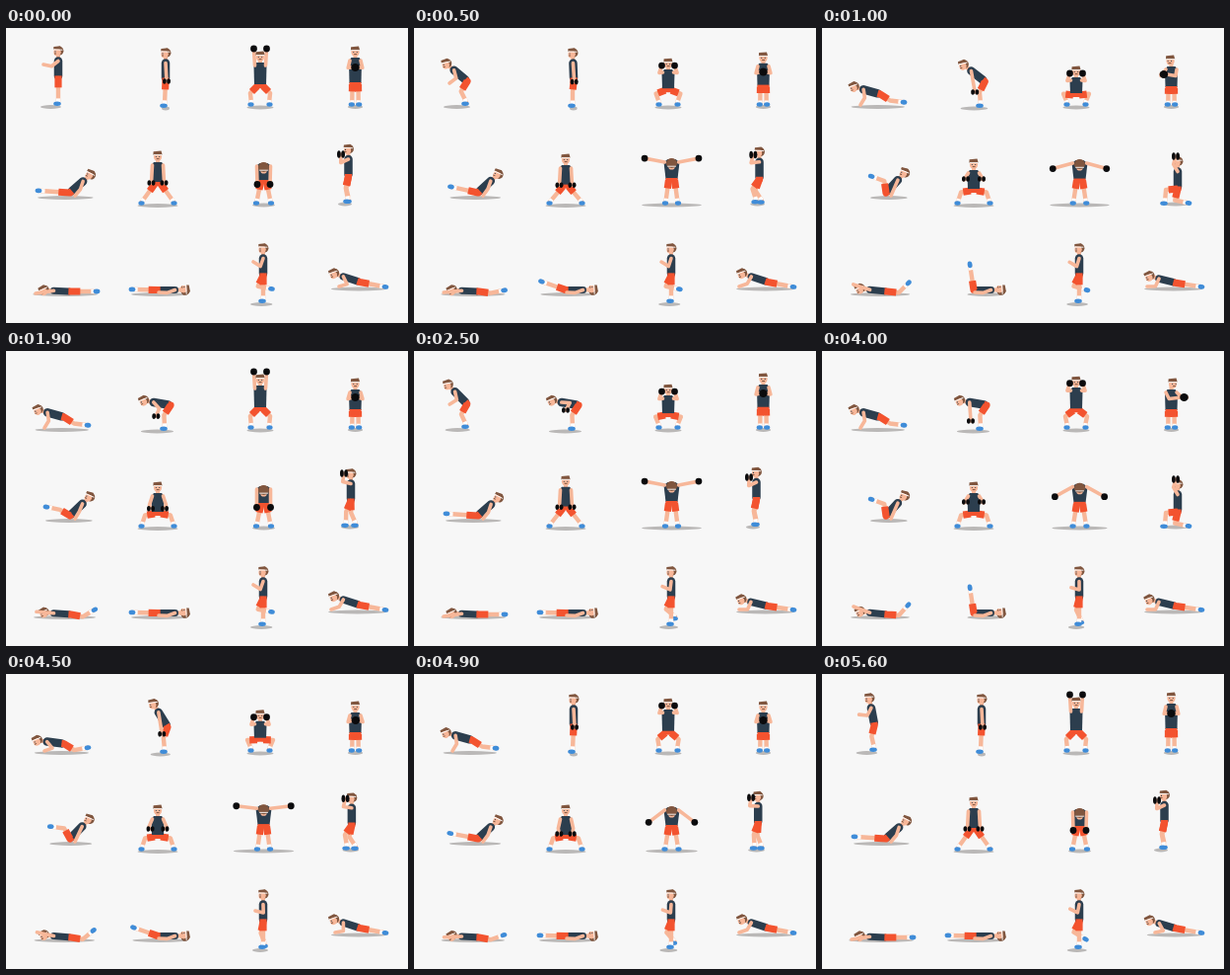
An HTML page with a canvas that plays this animation: 408x299 px, repeating every 5700 ms.

```html
<!DOCTYPE html>
<html lang="en">
<head>
<meta charset="utf-8">
<title>Workout</title>
<style>
html, body { margin: 0; width: 100%; height: 100%; overflow: hidden; background: #f7f7f7; }
canvas { display: block; width: 408px; height: 299px; }
</style>
</head>
<body>
<canvas id="stage"></canvas>
<script>
const W = 408, H = 299, LOOP = 5700, STEP = 100;
const SKIN = '#f7b799', HAIR = '#80563f', SHIRT = '#2c3e4e', SHORTS = '#f3532f',
      SHOE = '#3f8cd8', SHADOW = '#bab8b7', IRON = '#0b0b0d', WHITE = '#fff';
const TORSO = 17.5, NECK = 10, LEG = 24, FRONT_LEG = 20, ARM = 17;

const canvas = document.getElementById('stage');
const ctx = canvas.getContext('2d');
const ratio = window.devicePixelRatio || 1;
canvas.width = W * ratio;
canvas.height = H * ratio;

// Timing and geometry
const ease = x => { x = Math.min(1, Math.max(0, x)); return x * x * (3 - 2 * x); };
const ramp = (t, from, to) => ease((t - from) / (to - from));
const hold = (t, a, b, c, d) => ramp(t, a, b) - ramp(t, c, d);   // rises a-b, falls c-d
const mix = (a, b, u) => Array.isArray(a) ? a.map((v, i) => mix(v, b[i], u)) : a + (b - a) * u;
const blend = (a, b, u) => Object.fromEntries(
  Object.entries(a).map(([key, v]) => [key, key in b ? mix(v, b[key], u) : v]));
const polar = ([x, y], angle, r) => [x + r * Math.sin(angle), y - r * Math.cos(angle)];

// How far the middle joint of a limb leaves the straight line between its ends.
const slack = (a, b, length) =>
  Math.sqrt(Math.max(0, length ** 2 - (b[0] - a[0]) ** 2 - (b[1] - a[1]) ** 2)) / 2;

function joint(a, b, length, bend) {
  const dx = b[0] - a[0], dy = b[1] - a[1];
  const k = bend * slack(a, b, length) / (Math.hypot(dx, dy) || 1);
  return [(a[0] + b[0]) / 2 - dy * k, (a[1] + b[1]) / 2 + dx * k];
}

// Drawing helpers
function line(color, width, ...pts) {
  ctx.strokeStyle = color;
  ctx.lineWidth = width;
  ctx.beginPath();
  pts.forEach(p => ctx.lineTo(...p));
  ctx.stroke();
}

function oval(color, x, y, rx, ry = rx, angle = 0) {
  ctx.fillStyle = color;
  ctx.beginPath();
  ctx.ellipse(x, y, rx, ry, angle, 0, 7);
  ctx.fill();
}

function shape(color, ...pts) {
  ctx.fillStyle = color;
  ctx.beginPath();
  pts.forEach(p => ctx.lineTo(...p));
  ctx.fill();
}

const dumbbell = ([x, y], ry = 3) => [-2.1, 2.1].forEach(d => oval(IRON, x + d, y, 1.9, ry));

function limb(waist, hip, knee, ankle) {
  line(SKIN, 4.4, hip, knee, ankle);
  ctx.lineCap = 'butt';
  line(WHITE, 4.2, mix(ankle, knee, .3), ankle);
  line(SHORTS, 7.2, waist, hip, mix(hip, knee, .78));
  ctx.lineCap = 'round';
}

function sideLeg(waist, hip, ankle) {
  const knee = joint(hip, ankle, LEG, 1);
  limb(waist, hip, knee, ankle);
  const shin = Math.atan2(ankle[1] - knee[1], ankle[0] - knee[0]);
  const standing = Math.sin(shin) > .6;
  if (standing) oval(SHOE, ankle[0] - 1, ankle[1] + 1.8, 3.8, 2.2);
  else oval(SHOE, ankle[0] + Math.cos(shin) * 2, ankle[1] + Math.sin(shin) * 2, 3.4, 2.4, shin);
}

function sideHead(x, y, tilt) {
  ctx.save();
  ctx.translate(x, y);
  ctx.rotate(tilt);
  oval(HAIR, 1.2, -.3, 4.2, 4.4);
  oval(SKIN, -1, 1, 3.6, 4);
  shape(HAIR, [-4.8, -2], [-4.6, -4.6], [2, -5.2], [4.6, -2]);
  line(WHITE, .9, [-4.2, -1.6], [4, -1.3]);
  oval(SKIN, 1.4, .9, 1.2);
  oval(SHIRT, -3, .4, .6);
  line(HAIR, 1, [-3.8, 2.5], [-2.4, 2.5]);
  ctx.restore();
}

function frontHead(x, y, turn) {
  oval(SKIN, x, y + .5, 4.1, 4.7);
  shape(HAIR, [x - 4.6, y - 1.6], [x - 4.4, y - 4.8], [x + 3.5, y - 5.4], [x + 4.6, y - 1.6]);
  line(WHITE, .9, [x - 3.9, y - 1.4], [x + 3.9, y - 1.4]);
  [-1.7, 1.7].forEach(d => oval(SHIRT, x + d + turn, y + .5, .6));
  line(HAIR, 1, [x - 1.2 + turn, y + 2.6], [x + 1.2 + turn, y + 2.6]);
}

function topHead(x, y) {
  oval(SKIN, x, y + 4.5, 3, 2);
  oval(HAIR, x, y, 5.6, 5);
  line(WHITE, .9, [x - 4, y + 3.2], [x + 4, y + 3.2]);
}

// Figure seen from the side, facing left: lean turns the torso about the hip,
// knees and elbows follow from where hands and feet are.
function side({ hip, lean, hand, foot, foot2 }, floor, { girth = 8.5, iron } = {}) {
  const shoulder = polar(hip, lean, TORSO);
  const head = polar(shoulder, lean, NECK);
  const waist = mix(hip, shoulder, .15);
  const xs = [hip, head, hand, foot, foot2 || foot].map(p => p[0]);
  const left = Math.min(...xs), right = Math.max(...xs);
  oval(SHADOW, (left + right) / 2, floor, (right - left) / 2 + 3, 1.9);

  if (foot2) sideLeg(waist, hip, foot2);
  line(SKIN, 4, head, shoulder);
  line(SHIRT, girth, shoulder, waist);
  sideLeg(waist, hip, foot);
  sideHead(...head, lean > 0 ? .6 * lean * lean : .3 * lean);
  line(SKIN, 3.6, shoulder, joint(shoulder, hand, ARM, -1), hand);
  if (iron) dumbbell(hand, iron);
}

// Figure seen from the front and mirrored about x; hand and foot are [offset, y].
function front({ head, hip, hand, foot, twist = 0 }, x, floor, { bent, bow = 1, iron } = {}) {
  const top = head + (bent ? -4 : 6), wide = bent ? 8 : 6.5;
  const shoulder = [wide - 1, top + 3];
  const both = draw => [-1, 1].forEach(s => draw(([dx, y], shift = 0) => [x + s * dx + shift, y]));
  const bend = slack(shoulder, hand, ARM);
  const middle = mix(shoulder, hand, .5);
  const elbow = [middle[0] + bend * .4, middle[1] + bend * .5];
  const thigh = [3, hip + 2];
  const knee = joint(thigh, foot, FRONT_LEG, -bow);
  oval(SHADOW, x, floor, Math.max(foot[0] + 4.5, hand[0] + 3), 1.9);

  both(at => {
    limb(at(thigh), at(thigh), at(knee), at(foot));
    oval(SHOE, ...at([foot[0] + .5, foot[1] + 1.5]), 3.1, 2.2);
  });
  line(SKIN, 4, [x, head], [x, top + 1]);
  shape(SHIRT, [x - 4, top], [x + 4, top], [x + wide, top + 3], [x + 6, hip + 1],
        [x - 6, hip + 1], [x - wide, top + 3]);
  shape(SHORTS, [x - 6, hip], [x + 6, hip], [x + 6, hip + 4], [x - 6, hip + 4]);
  both(at => line(SKIN, 3.6, at(shoulder), at(elbow, twist * .4), at(hand, twist)));
  if (bent) topHead(x, head);
  else frontHead(x + twist * .12, head, twist * .1);
  if (iron === 'single') oval(IRON, x + twist, hand[1], 4.3, 4);
  else both(at => iron === 'small' ? dumbbell(at(hand), 2.8) : oval(IRON, ...at(hand), 3.4));
}

// Exercises
function burpee(time) {
  const t = time % 2850;
  const stand = { hip: [53, 51], lean: 0, hand: [38, 37], foot: [53, 75] };
  const crouch = { hip: [54, 54], lean: -.87, hand: [36, 56] };
  const plank = { hip: [59, 67], lean: -1.3, hand: [39, 78], foot: [81, 75] };
  const down = { hip: [59, 72], lean: -1.5 };
  let pose = blend(stand, crouch, hold(t, 0, 450, 2400, 2900));
  pose = blend(pose, plank, hold(t, 550, 850, 2150, 2380));
  side(blend(pose, down, hold(t, 1250, 1550, 1550, 1850)), 80);
}

function deadlift(time) {
  const t = time % 5600;
  const stand = { hip: [162, 53], lean: 0, hand: [163, 54], foot: [161, 77] };
  const bent = { hip: [167, 55], lean: -1.4, hand: [151, 71] };
  const pose = blend(stand, bent, hold(t, 400, 1400, 4100, 4800));
  const row = hold(t, 1600, 2250, 2600, 3300);
  side(blend(pose, { hand: [154, 60] }, row), 81.5, { iron: 2.8 });
}

function thruster(time) {
  const t = time % (5600 / 3);
  const squat = hold(t, 40, 1000, 1000, 1200);
  const rack = hold(t, 40, 300, 1250, 1500);
  const head = 29 + 15 * squat;
  front({ head, hip: 57 + 9 * squat, hand: [6.5, head - 8 + 10 * rack], foot: [9, 76] }, 258, 80.5);
}

function kettlebell(time) {
  const t = time % 2800;
  const sink = hold(t, 200, 700, 2200, 2750);
  const turn = hold(t, 750, 1200, 1250, 1750) * (time % 5600 < 2800 ? -1 : 1);
  front({ head: 24 + 9 * sink, hip: 55 + 4 * sink, hand: [3, 40 + 7 * sink], foot: [3.2, 76],
          twist: 13 * turn }, 354.5, 80, { bow: 0, iron: 'single' });
}

function tuck(time) {
  const u = hold(time % 2800, 300, 900, 1300, 2450);
  side({ hip: [65, 167], lean: .85 - .1 * u, hand: [70, 170], foot: mix([35, 165], [52, 151], u) }, 172);
}

function sumoCurl(time) {
  const t = time % 2800;
  const squat = hold(t, 250, 850, 2150, 2650);
  const curl = hold(t, 700, 1000, 1250, 2300);
  front({ head: 130 + 8 * squat, hip: 156 + 7 * squat, foot: [16, 176],
          hand: [6.5 + 1.5 * curl, 157 + 6 * squat - 10 * curl] }, 154, 180, { iron: 'small' });
}

function reverseFly(time) {
  const lift = hold(time % (5600 / 3), 0, 480, 633, 1700);
  const hand = polar([6.5, 137], Math.PI - 1.8 * lift, 21.5);
  front({ head: 141 - 4 * lift, hip: 154 - 2 * lift, hand, foot: [7 - lift, 176] },
        261.5, 179.5, { bent: true });
}

function lunge(time) {
  const t = time % 2800;
  const ready = { hip: [347.5, 150.5], lean: 0, hand: [340, 128], foot: [347, 174], foot2: [348, 174] };
  const kneel = { hip: [361, 163], hand: [359, 130], foot: [348, 176], foot2: [370, 177] };
  const pace = { hip: [350, 152], hand: [343, 124], foot: [345, 175], foot2: [355, 175] };
  const pose = blend(ready, pace, hold(t, 1500, 1850, 1900, 2450));
  side(blend(pose, kneel, hold(t, 300, 950, 1250, 1850)), 178.5, { iron: 3.8 });
}

function superman(time) {
  const u = hold(time % 2800, 350, 1150, 1300, 2450);
  side({ hip: [66, 267], lean: -1.53 + .06 * u, hand: mix([30, 269], [32, 259], u),
         foot: mix([90, 267], [86, 259], u) }, 270, { girth: 7 });
}

function legRaise(time) {
  const u = hold(time % 2800, 300, 950, 1250, 1900);
  const hip = [154, 265.5];
  side({ hip, lean: 1.57, hand: [155, 268], foot: polar(hip, -1.55 + 1.4 * u, LEG) }, 270, { girth: 7 });
}

function run(time) {
  const kick = .5 + .5 * Math.cos(time / 475 * 2 * Math.PI);
  side({ hip: [261, 251], lean: 0, hand: [253 - 2 * kick, 240 - 3 * kick], foot: [261, 275],
         foot2: mix([263, 274], [267.5, 264], kick) }, 280);
}

function forearmPlank(time) {
  const t = time % 1425;
  const reach = hold(t, 50, 400, 1180, 1320);
  const sink = hold(t, 650, 1100, 1200, 1400);
  side({ hip: [359, 257.5 + sink], lean: -1.25 - .08 * sink, hand: [338 - 8 * reach, 262],
         foot: [383, 262] }, 264.5, { girth: 7.5 });
}

const exercises = [burpee, deadlift, thruster, kettlebell, tuck, sumoCurl, reverseFly, lunge,
                   superman, legRaise, run, forearmPlank];

function render(time) {
  ctx.setTransform(ratio, 0, 0, ratio, 0, 0);
  ctx.fillStyle = '#f7f7f7';
  ctx.fillRect(0, 0, W, H);
  ctx.lineCap = ctx.lineJoin = 'round';
  exercises.forEach(draw => draw(time));
}

const origin = performance.now();
function tick() {
  const t = (performance.now() - origin) % LOOP;
  render(Math.floor(t / STEP) * STEP);
  requestAnimationFrame(tick);
}
tick();
</script>
</body>
</html>
```
